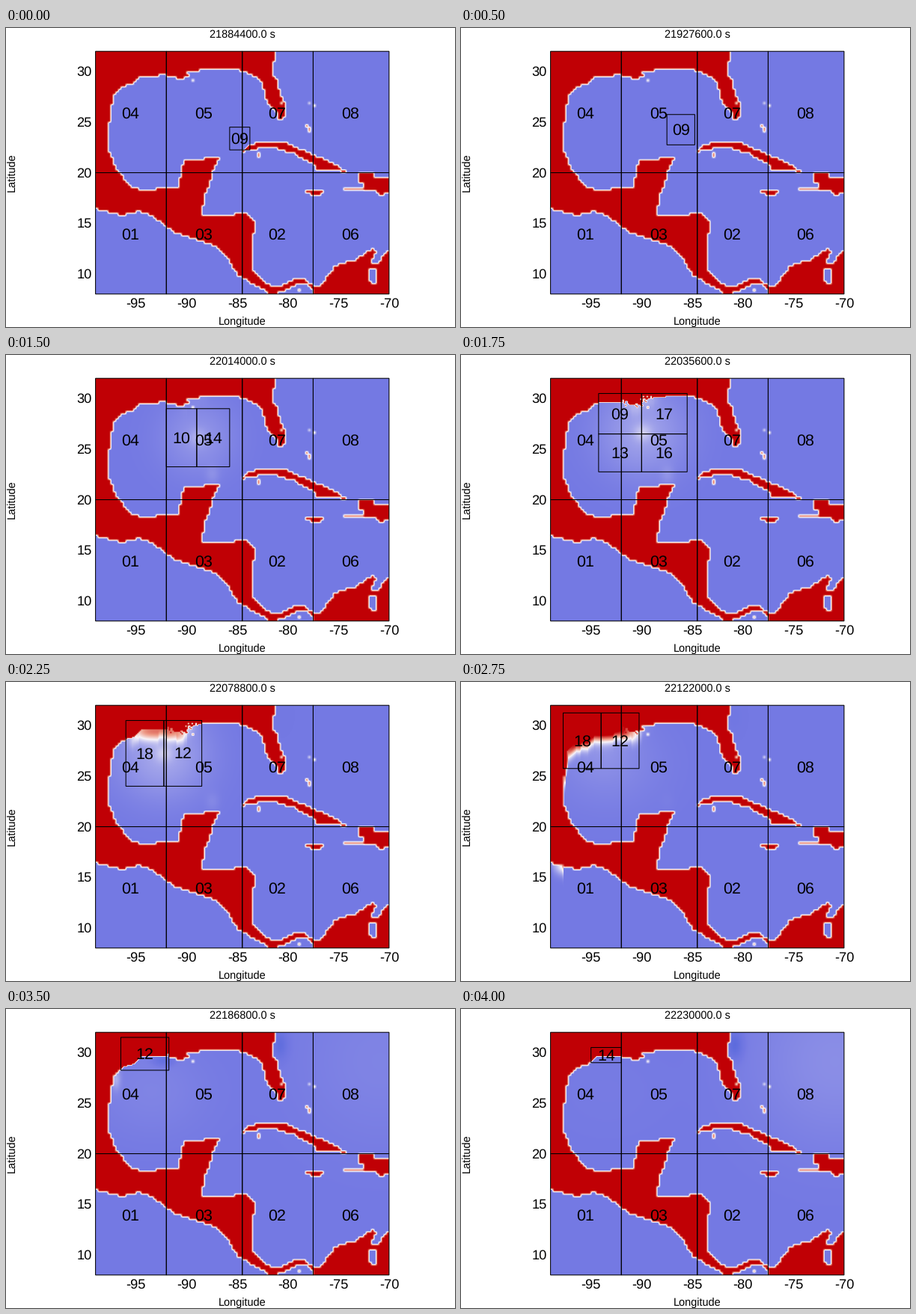
A matplotlib script that plays this animation: 600x400 px, repeating every 4250 ms.

```python
import numpy as np
import matplotlib.pyplot as plt
from matplotlib.animation import FuncAnimation
from matplotlib.patches import Rectangle
from matplotlib.path import Path

plt.rcParams.update({"font.family": "Liberation Sans", "text.hinting": "none"})
FRAMES, STEP = 17, 250
COLS, ROWS = 116, 96
X0, Y0, W, H = 119.6, 31.2, 392.3, 324.6
CELL = W / COLS

# Key points of the coastlines, in stage pixels
gulf = [(110, 20), (361, 20), (361, 38), (358, 45), (358, 64), (363, 70), (364, 81),
        (373, 104), (373, 116), (370, 122), (365, 124), (363, 115), (349, 98),
        (341, 70), (322, 60), (306, 54), (250, 57), (240, 60), (246, 65), (232, 68),
        (214, 63), (180, 64), (170, 74), (158, 77), (142, 93), (141, 118), (138, 125),
        (138, 166), (150, 193), (168, 212), (180, 217), (231, 213), (236, 183),
        (240, 176), (286, 174), (276, 190), (272, 212), (268, 214), (261, 250),
        (322, 249), (333, 260), (328, 295), (331, 325), (350, 343), (362, 347),
        (385, 337), (400, 337), (412, 346), (420, 346), (440, 318), (465, 311),
        (478, 303), (490, 296), (496, 299), (487, 313), (497, 315), (509, 299),
        (520, 299), (520, 365)]
pacific = [(412, 365), (409, 350), (403, 344), (390, 343), (368, 353), (356, 357),
           (310, 331), (295, 306), (282, 292), (225, 273), (205, 258), (195, 251),
           (178, 245), (155, 251), (110, 239)]
cuba = [(314, 166), (325, 157), (340, 153), (374, 153), (395, 163), (430, 178),
        (455, 192), (415, 191), (414, 184), (385, 168), (360, 160), (345, 159)]
hispaniola = [(472, 193), (490, 193), (493, 200), (520, 201), (520, 218), (507, 222),
              (498, 225), (495, 217), (475, 217), (478, 209), (472, 207)]
jamaica = [(399, 217), (418, 216), (427, 220), (418, 224), (408, 224)]
LANDS = [Path(p) for p in (gulf + pacific, cuba, hispaniola, jamaica)]
LAKE = Path([(485, 323), (494, 323), (497, 332), (494, 342), (485, 340)])
# Islets narrower than a cell: x, y, land share
ISLETS = [(405, 101, .25), (413, 105, .4), (338, 168, .7), (338, 172, .7), (401, 130, .8),
          (404, 134, .7), (406, 138, .6), (367, 102, .4), (392, 350, .6),
          (249, 69, .4)] + [(x, 216, .65) for x in range(454, 478, 3)]

px, py = np.meshgrid(np.arange(120, 512) + .5, np.arange(31, 356) + .5)


def land_mask(scale, rough=0):
    """Rasterise land on a cell grid, then interpolate it to pixels."""
    nx, ny = COLS * scale, ROWS * scale
    cx, cy = np.meshgrid(X0 + (np.arange(nx) + .5) * W / nx,
                         Y0 + (np.arange(ny) + .5) * H / ny)
    delta = rough * ((cx > 215) & (cx < 256) & (cy < 76))
    shift = np.random.default_rng(4).uniform(-1, 1, (2, ny, nx)) * delta
    pts = np.column_stack([(cx + shift[0]).ravel(), (cy + shift[1]).ravel()])
    inside = np.any([p.contains_points(pts) for p in LANDS], axis=0)
    grid = (inside & ~LAKE.contains_points(pts)).reshape(ny, nx).astype(float)
    for x, y, share in ISLETS:
        r, c = int((y - Y0) / CELL) * scale, int((x - X0) / CELL) * scale
        grid[r:r + scale, c:c + scale] = share
    u = np.clip((px[0] - X0) * nx / W - .5, 0, nx - 1.001)
    v = np.clip((py[:, 0] - Y0) * ny / H - .5, 0, ny - 1.001)[:, None]
    i, j = v.astype(int), u.astype(int)
    fv, fu = v - i, u - j
    top = grid[i, j] * (1 - fu) + grid[i, j + 1] * fu
    low = grid[i + 1, j] * (1 - fu) + grid[i + 1, j + 1] * fu
    return top * (1 - fv) + low * fv


COARSE, FINE = land_mask(1), land_mask(2, 4)
DEPTH = np.clip(py - py[0, 0] - np.argmax(COARSE < .5, axis=0), 0, None)

# Water level to colour
LEVELS = [-.4, 0, .35, .6, 1]
COLORS = np.array([(30, 70, 205), (116, 121, 227), (248, 244, 248),
                   (238, 155, 135), (192, 0, 5)]) / 255

# Refined region in cells: left, top, right, bottom
BOX_KEYS = {0: (53, 30, 61, 39), 5: (36, 18, 52, 33), 7: (19, 6, 54, 37),
            9: (12, 6, 42, 32), 11: (5, 3, 35, 25), 13: (7, 0, 29, 16), 16: (16, 6, 28, 12)}

# Slow swells: x, y, x spread, y spread, height, peak time, duration
SWELLS = [(210, 69, 13, 7, -.42, 13, .8), (147, 94, 6, 14, .36, 13, 1),
          (195, 110, 75, 60, .05, 12, 3), (276, 160, 9, 12, .05, 7, 3),
          (500, 70, 110, 110, .06, 16, 2.5), (366, 48, 10, 18, -.12, 15.5, 3)]


def colorize(v):
    return np.stack([np.interp(v, LEVELS, c) for c in COLORS.T], axis=-1)


def pulse(k, peak, span):
    return np.exp(-((k - peak) / span) ** 2)


def bell(x, y, sx, sy):
    return np.exp(-((px - x) / sx) ** 2 - ((py - y) / sy) ** 2)


def to_px(col, row):
    return X0 + col * CELL, Y0 + row * CELL


def region(k):
    keys = list(BOX_KEYS)
    return [round(np.interp(k, keys, side)) for side in zip(*BOX_KEYS.values())]


def water(k):
    """The storm rides in the middle of the refined region."""
    l, t, r, b = region(k)
    x, y = to_px((l + r) / 2, (t + b) / 2)
    power = pulse(k, 8, 2.8)
    radius = 30 + 30 * power
    level = power * (.13 * bell(x, y, radius, radius) + .14 * bell(x, y, 11, 11))
    surge = 1.15 * pulse(k, 11, 2.5 if k < 11 else 1)
    width = 6 * max(k - 3, 2)
    level += surge * np.exp(-(DEPTH / 12) ** 2 - ((px - x + 4) / width) ** 4)
    for sx, sy, wx, wy, height, peak, span in SWELLS:
        level += height * pulse(k, peak, span) * bell(sx, sy, wx, wy)
    return level


def names(k):
    if k < 6:
        return ["10" if k % 2 else "09"]
    if k > 12:
        return ["16 12 15 14".split()[k - 13]]
    if k == 7:
        return ["09", "17", "13", "16"]
    return ["18", "12"] if k % 2 else ["10", "14"]


def patches(k):
    labels = names(k)
    l, t, r, b = region(k)
    xs = [l, (l + r) // 2, r] if len(labels) > 1 else [l, r]
    ys = [t, (t + b + 1) // 2, b] if len(labels) > 2 else [t, b]
    cells = [(x, y, x2, y2) for y, y2 in zip(ys, ys[1:]) for x, x2 in zip(xs, xs[1:])]
    if k == 13:
        cells.append((5, 21, 12, 27))
        labels.append("13")
    return [(*to_px(*c[:2]), *to_px(*c[2:]), s) for c, s in zip(cells, labels)]


fig = plt.figure(figsize=(6, 4), dpi=100, facecolor="white")
ax = fig.add_axes([0, 0, 1, 1])
ax.axis("off")
image = ax.imshow(np.zeros(px.shape + (3,)), extent=[120, 512, 356, 31],
                  interpolation="nearest", aspect="auto")
ax.set_xlim(0, 600)
ax.set_ylim(400, 0)


def write(x, y, s, size, **kw):
    return ax.text(x, y, s, fontsize=size * .72, color="black",
                   **{"ha": "center", "va": "baseline", "zorder": 4, **kw})


def outline(l, t, r, b):
    return ax.add_patch(Rectangle((l, t), r - l, b - t, fill=False, ec="black",
                                  lw=.75, zorder=3, snap=False))


# Coarse patches, then axis labels
cols, rows = (0, 28, 58, 86, COLS), (0, ROWS // 2, ROWS)
for row in range(2):
    for col in range(4):
        outline(*to_px(cols[col], rows[row]), *to_px(cols[col + 1], rows[row + 1]))
for y, line in ((113, "04 05 07 08"), (275, "01 03 02 06")):
    for i, name in enumerate(line.split()):
        write(166.5 + 98 * i, y + 7.5, name, 21.5)
for lat in range(10, 31, 5):
    write(114.5, Y0 + (32 - lat) * H / 24 + 6, str(lat), 18.3, ha="right")
for lon in range(-95, -69, 5):
    write(X0 + (lon + 99) * W / 29, 374, str(lon), 18.3)
write(316, 397, "Longitude", 14.5)
write(13, 193.5, "Latitude", 14.5, rotation=90, rotation_mode="anchor")
title = write(316, 12.5, "", 14.5)
moving = []


def draw(k):
    while moving:
        moving.pop().remove()
    land = COARSE.copy()
    for l, t, r, b, name in patches(k):
        inside = (px > l) & (px < r) & (py > t) & (py < b)
        land[inside] = FINE[inside]
        moving.append(outline(l, t, r, b))
        moving.append(write((l + r) / 2, (t + b) / 2 + 7, name, 21.5))
    image.set_data(colorize(land + (1 - land) * water(k)))
    title.set_text(f"{21884400 + 21600 * k:.1f} s")
    return [image, title, *moving]


anim = FuncAnimation(fig, draw, frames=FRAMES, interval=STEP, init_func=lambda: draw(0),
                     repeat=True, repeat_delay=0)
plt.show()
```
